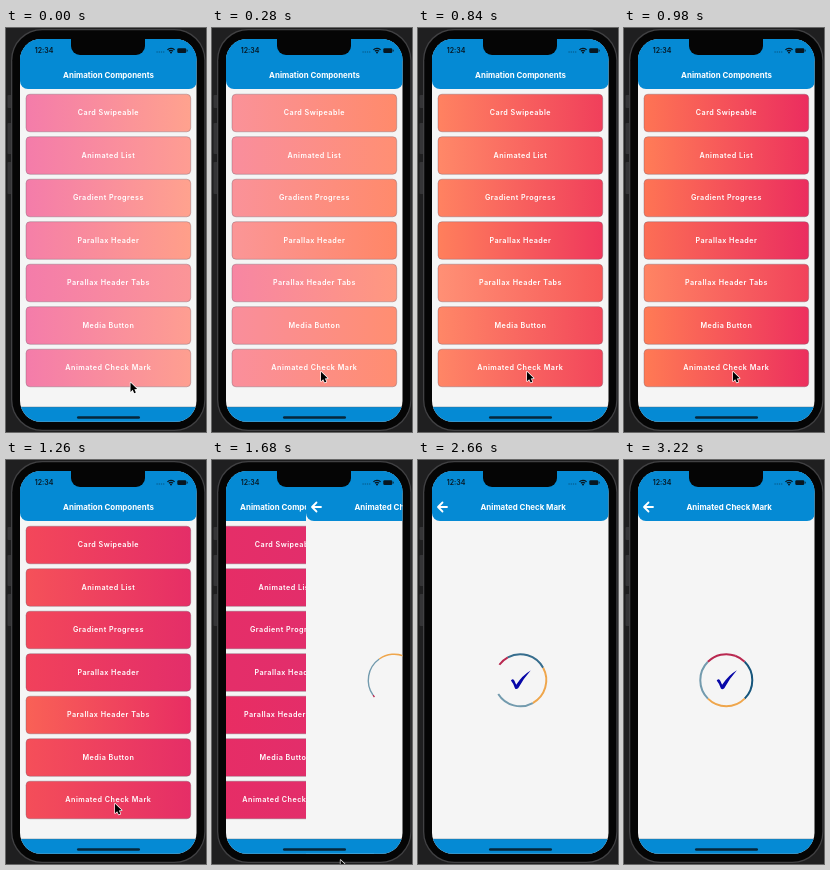
Animation, 200 px wide and 404 px high, one loop 3.36 s. Source, as an HTML page with a canvas:

```html
<!DOCTYPE html>
<html lang="en">
<head>
<meta charset="utf-8">
<title>Animation Components</title>
<style>
html, body { margin: 0; width: 100%; height: 100%; overflow: hidden; background: #1c1c1d; }
canvas { display: block; width: 200px; height: 404px; }
</style>
</head>
<body>
<canvas id="stage"></canvas>
<script>
const LOOP = 3360, STEP = 140;
const BLUE = '#058ad4', PAPER = '#f5f5f5', INK = '#071722', BLACK = '#050505';
const FONT = 'Inter, Roboto, sans-serif';
const LEFT = 14, WIDTH = 177;

// Each button with the delay of its colour cycle in ms
const BUTTONS = [['Card Swipeable', 0], ['Animated List', 60], ['Gradient Progress', 0],
  ['Parallax Header', -40], ['Parallax Header Tabs', 160], ['Media Button', 50],
  ['Animated Check Mark', 40]];

// Colour strip that travels under the buttons, one stop every STOP ms
const STOP = 475;
const STRIP = [[244, 124, 170], [255, 162, 142], [255, 121, 83], [236, 45, 94], [224, 46, 110]];

const RED = [185, 40, 80], NAVY = [23, 86, 124], ORANGE = [239, 166, 76], STEEL = [115, 155, 174];

const canvas = document.getElementById('stage');
const dpr = window.devicePixelRatio || 1;
canvas.width = 200 * dpr;
canvas.height = 404 * dpr;
const c = canvas.getContext('2d');

const clamp = (v, lo, hi) => Math.min(hi, Math.max(lo, v));
const ramp = (t, from, to) => clamp((t - from) / (to - from), 0, 1);
const easeOut = (p, n) => 1 - (1 - p) ** n;
const mix = (a, b, p) => a.map((v, i) => v + (b[i] - v) * p);
const rgb = v => `rgb(${v.map(Math.round).join(',')})`;

function stripColor(t) {
  const u = clamp(t / STOP, 0, STRIP.length - 1);
  const i = Math.min(Math.floor(u), STRIP.length - 2);
  return rgb(mix(STRIP[i], STRIP[i + 1], u - i));
}

function box(x, y, w, h, r, fill) {
  c.beginPath();
  c.roundRect(x, y, w, h, r);
  if (fill) {
    c.fillStyle = fill;
    c.fill();
  }
}

function poly(points) {
  c.beginPath();
  points.forEach(([x, y], i) => i ? c.lineTo(x, y) : c.moveTo(x, y));
}

function label(text, x, y, size, weight, color, spacing = 0) {
  c.font = `${weight} ${size}px ${FONT}`;
  c.letterSpacing = spacing + 'px';
  c.fillStyle = color;
  c.textAlign = 'center';
  c.textBaseline = 'alphabetic';
  c.fillText(text, x, y);
}

function page(x, title, titleX) {
  c.fillStyle = PAPER;
  c.fillRect(x, 11, WIDTH, 384);
  box(x, 0, WIDTH, 61, [0, 0, 8, 8], BLUE);
  label(title, x + titleX, 50, 7.9, 700, '#fff');
}

function button(x, y, text, t) {
  const grad = c.createLinearGradient(x, 0, x + 165, 0);
  grad.addColorStop(0, stripColor(t));
  grad.addColorStop(1, stripColor(t + STOP));
  box(x, y, 164.7, 37.6, 4, grad);
  c.strokeStyle = 'rgba(110,90,105,.5)';
  c.lineWidth = 0.7;
  c.stroke();
  label(text, x + 82.4, y + 21.1, 7.2, 600, '#fff', 0.48);
}

function listPage(x, t) {
  page(x, 'Animation Components', 88.5);
  BUTTONS.forEach(([text, delay], i) => button(x + 6, 66.2 + i * 42.5, text, t - delay));
}

function ring(x, y, t) {
  const grow = ramp(t, 2100, 2940);
  const turn = 720 - 620 * (1 - ramp(t, 1540, 3080)) ** 1.64;
  const from = -50 - 20 * ramp(t, 1680, 2100);
  const to = from + 155 + 205 * grow;
  const colors = [RED, mix(STEEL, NAVY, grow), ORANGE, STEEL];
  const rad = d => (d + turn) * Math.PI / 180;
  c.lineWidth = 1.4 + 0.6 * ramp(t, 1680, 2100);
  c.lineCap = 'butt';
  for (let k = 0; k < 5; k++) {
    const a = Math.max(from, k * 90 - 135);
    const b = Math.min(to, k * 90 - 45);
    if (b <= a) continue;
    c.beginPath();
    c.arc(x, y, 26, rad(a), rad(b));
    c.strokeStyle = rgb(colors[k % 4]);
    c.stroke();
  }
}

function check(x, y, t) {
  const scale = easeOut(ramp(t, 1960, 2940), 3);
  if (!scale) return;
  c.save();
  c.translate(x, y);
  c.scale(scale, scale);
  c.globalAlpha = ramp(t, 1960, 2300);
  c.beginPath();
  c.moveTo(-9.6, 0.2);
  c.quadraticCurveTo(-7.2, -2.4, -6, 0.6);
  c.lineTo(-4.2, 4.6);
  c.quadraticCurveTo(2, -5, 10.6, -10);
  c.quadraticCurveTo(3, -1.5, -2, 8);
  c.quadraticCurveTo(-4, 10, -5.4, 8.4);
  c.quadraticCurveTo(-7, 3.2, -9.6, 0.2);
  c.fillStyle = '#0808a8';
  c.fill();
  c.restore();
}

function checkPage(x, t) {
  page(x, 'Animated Check Mark', 91.2);
  c.strokeStyle = '#fff';
  c.lineWidth = 1.8;
  c.lineCap = c.lineJoin = 'round';
  poly([[x + 10.5, 42.5], [x + 6, 47], [x + 10.5, 51.5]]);
  c.moveTo(x + 6.5, 47);
  c.lineTo(x + 15, 47);
  c.stroke();
  ring(x + 88.3, 220.2, t);
  check(x + 88.3, 220.2, t);
}

function phoneBody() {
  c.fillStyle = '#1f1f20';
  c.fillRect(0, 0, 200, 404);
  [[67, 13], [95, 31], [134, 32]].forEach(([y, h]) => box(1.5, y, 5, h, 1, '#353537'));
  box(5, 1, 194.5, 402, 31, '#414143');
  box(6.3, 2.3, 192, 399.4, 30, BLACK);
}

function statusBar() {
  c.fillStyle = BLUE;
  c.fillRect(LEFT, 11, WIDTH, 22);
  label('12:34', 38, 25.4, 7, 600, INK);
  c.fillStyle = 'rgba(7,23,34,.4)';
  for (let i = 0; i < 4; i++) c.fillRect(150.5 + i * 2.2, 23.4, 1.2, 1.2);
  c.strokeStyle = c.fillStyle = INK;
  c.lineWidth = 1.2;
  c.lineCap = 'butt';
  for (const r of [4.9, 2.9]) {
    c.beginPath();
    c.arc(165, 25.2, r, -Math.PI * 0.76, -Math.PI * 0.24);
    c.stroke();
  }
  c.beginPath();
  c.arc(165, 24.6, 1, 0, 7);
  c.fill();
  box(171.3, 20.2, 9, 4.8, 1.3, INK);
  c.fillRect(180.8, 21.7, 0.8, 1.8);
  box(65, 3, 74, 24, [0, 0, 9, 9], BLACK);
}

function bottomBar() {
  c.fillStyle = BLUE;
  c.fillRect(LEFT, 379, WIDTH, 16);
  c.fillStyle = 'rgba(70,100,120,.5)';
  c.fillRect(LEFT, 378.6, WIDTH, 0.8);
  box(71, 388.3, 63, 2.4, 1.2, '#06263a');
}

function pointer(t) {
  const rest = [109, 343.8];
  const [x, y] = t < 1400
    ? mix([124.5, 354.5], rest, ramp(t, 0, 280))
    : mix(rest, [128.5, 400], easeOut(ramp(t, 1400, 1680), 2));
  c.save();
  c.translate(x, y);
  c.scale(0.92, 0.92);
  poly([[0, 0], [0, 10.2], [2.4, 8], [4, 11.7], [5.8, 10.9], [4.2, 7.3], [7.3, 7.1]]);
  c.closePath();
  c.lineJoin = 'round';
  c.lineWidth = 1.4;
  c.strokeStyle = '#fff';
  c.stroke();
  c.fillStyle = '#000';
  c.fill();
  c.restore();
}

function draw(t) {
  c.setTransform(dpr, 0, 0, dpr, 0, 0);
  phoneBody();
  c.save();
  box(LEFT, 11, WIDTH - 0.5, 382.8, 21);
  c.clip();
  // Whole pixels keep the seam between the pages clean
  const slide = Math.floor(WIDTH * Math.exp(-Math.max(0, t - 1605) / 95));
  if (slide > 0) listPage(LEFT - Math.round((WIDTH - slide) * 0.3), t);
  if (slide < WIDTH) checkPage(LEFT + slide, t);
  statusBar();
  bottomBar();
  c.restore();
  if (t < 1820) pointer(t);
}

function tick(now) {
  draw(Math.floor((now % LOOP) / STEP) * STEP);
  requestAnimationFrame(tick);
}
draw(0);
requestAnimationFrame(tick);
</script>
</body>
</html>
```
